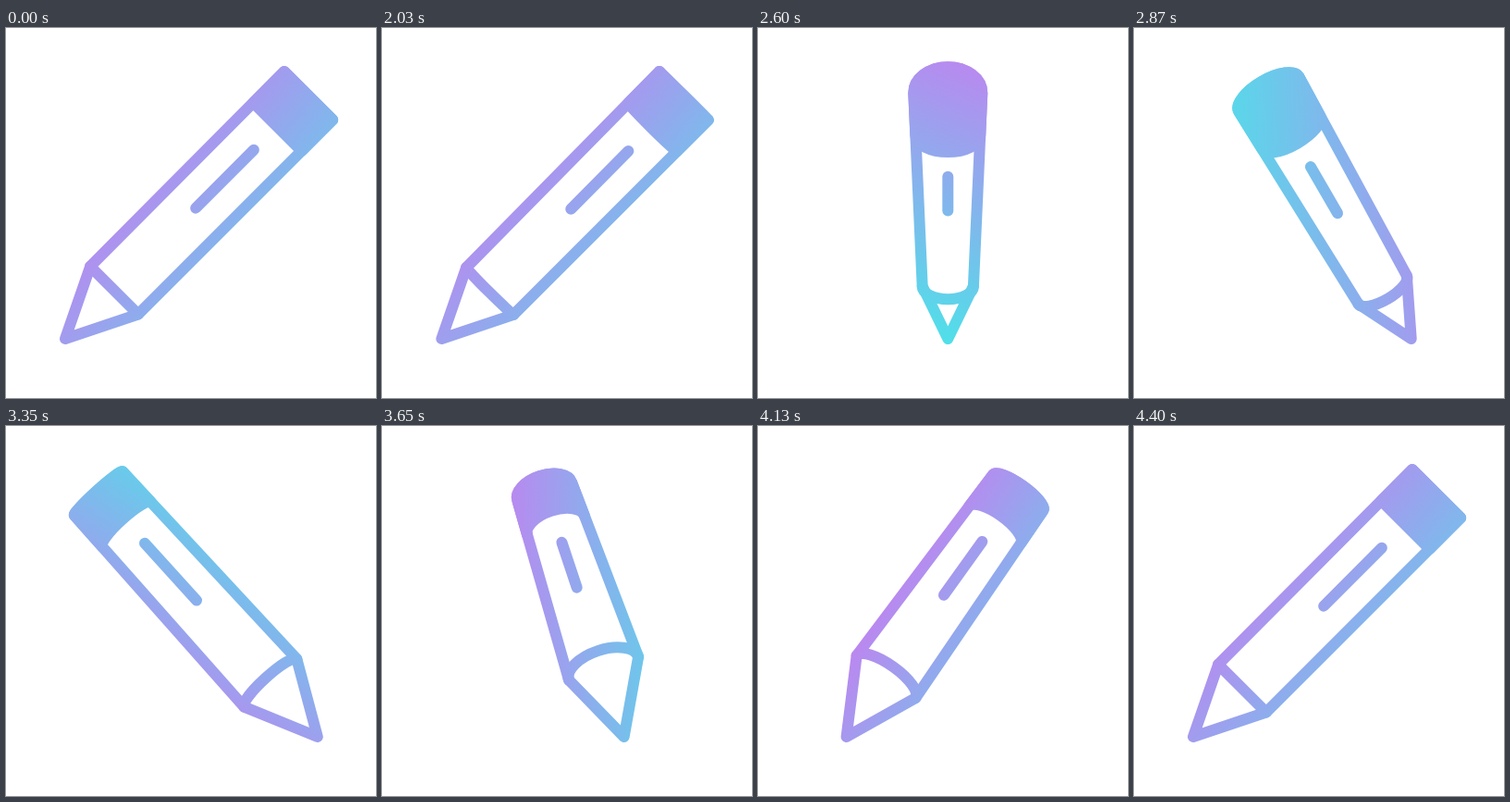
These frames come from a looping animation (400 by 400 pixels, 4430 ms). An HTML page:

```html
<!DOCTYPE html>
<html>
<head>
<meta charset="utf-8">
<style>
html, body { margin: 0; width: 100%; height: 100%; overflow: hidden; background: #fff; }
svg { display: block; width: 100vw; height: 100vh; }
</style>
</head>
<body>
<svg viewBox="0 0 400 400">
  <defs>
    <linearGradient id="tint" gradientUnits="userSpaceOnUse">
      <stop offset="0" stop-color="#c083f0"/>
      <stop offset="1" stop-color="#50dfe9"/>
    </linearGradient>
  </defs>
  <g fill="none" stroke="url(#tint)" stroke-width="12" stroke-linecap="round" stroke-linejoin="round">
    <path id="body"/>
    <path id="collar"/>
    <path id="eraser" fill="url(#tint)"/>
    <path id="slot"/>
  </g>
</svg>
<script>
const LOOP = 4430, HOLD = 2000, STEP = 30, TURN = 4.5, MID = 205.3;
const rad = d => d * Math.PI / 180;
const el = id => document.getElementById(id);
const path = (id, d) => el(id).setAttribute('d', d);

const mix = (a, b, k) => [a[0] + (b[0] - a[0]) * k, a[1] + (b[1] - a[1]) * k];
const move = (p, dir, k) => [p[0] + dir[0] * k, p[1] + dir[1] * k];
const pt = p => p[0].toFixed(2) + ' ' + p[1].toFixed(2);

// Half ellipse from a to b; positive depth bends it toward the tip.
function arc(a, b, depth) {
  if (Math.abs(depth) < 0.05) return 'L' + pt(b);
  const dx = b[0] - a[0], dy = b[1] - a[1];
  const tilt = Math.atan2(dy, dx) * 180 / Math.PI;
  return `A${Math.hypot(dx, dy) / 2} ${Math.abs(depth)} ${tilt} 0 ${depth > 0 ? 0 : 1} ${pt(b)}`;
}

// The pencil leans and spins about the vertical line x = MID.
function draw(ms) {
  const turn = TURN * Math.max(0, Math.floor((ms % LOOP - HOLD) / STEP));
  const c = Math.cos(rad(turn)), s = Math.sin(rad(turn));

  // Flat size, change with depth, change with foreshortening.
  const fit = (flat, depth, short) => flat + depth * s + short * s * s;

  const tip = [MID - c * fit(141.3, 0, 7), 336];
  const neck = [MID - c * fit(88.3, 6, 8), fit(283.7, 10, -14.5)];
  const cap = [MID + c * fit(121.7, 0, -52), fit(73.2, 0, -3)];
  const slot = [MID + c * fit(31.2, -11, -40), fit(163.2, 15, 1)];

  const dx = cap[0] - neck[0], dy = cap[1] - neck[1], len = Math.hypot(dx, dy);
  const along = [dx / len, dy / len], across = [-dy / len, dx / len];

  const neckR = fit(36.6, -6, -3), capR = fit(37, 3.4, -3.4);
  const neckA = move(neck, across, -neckR), neckB = move(neck, across, neckR);
  const capA = move(cap, across, -capR), capB = move(cap, across, capR);
  const k = fit(0.16, 0.01, 0.05);
  const bandA = mix(capA, neckA, k), bandB = mix(capB, neckB, k);
  const half = fit(44.4, -2, -24);
  const top = `M${pt(capA)}${arc(capA, capB, -(24 + 4 * s) * s * s)}`;

  path('body', `${top}L${pt(neckB)}L${pt(tip)}L${pt(neckA)}Z`);
  path('collar', `M${pt(neckA)}${arc(neckA, neckB, fit(0, 18, -4))}`);
  path('eraser', `${top}L${pt(bandB)}${arc(bandB, bandA, -18 * s)}Z`);
  path('slot', `M${pt(move(slot, along, half))}L${pt(move(slot, along, -half))}`);

  // The colour ramp turns along with the pencil.
  const angle = rad(turn + 64 - 25 * c - 43 * s);
  const dir = [Math.cos(angle), Math.sin(angle)];
  const span = 265 + 45 * s, share = 0.44 - 0.1 * c + 0.11 * s;
  const from = move([MID, 190], dir, -share * span), to = move(from, dir, span);
  const ends = { x1: from[0], y1: from[1], x2: to[0], y2: to[1] };
  for (const e in ends) el('tint').setAttribute(e, ends[e].toFixed(2));
}

let start;
function tick(now) {
  if (start === undefined) start = now;
  draw(Math.max(0, now - start));
  requestAnimationFrame(tick);
}
draw(0);
requestAnimationFrame(tick);
</script>
</body>
</html>
```
